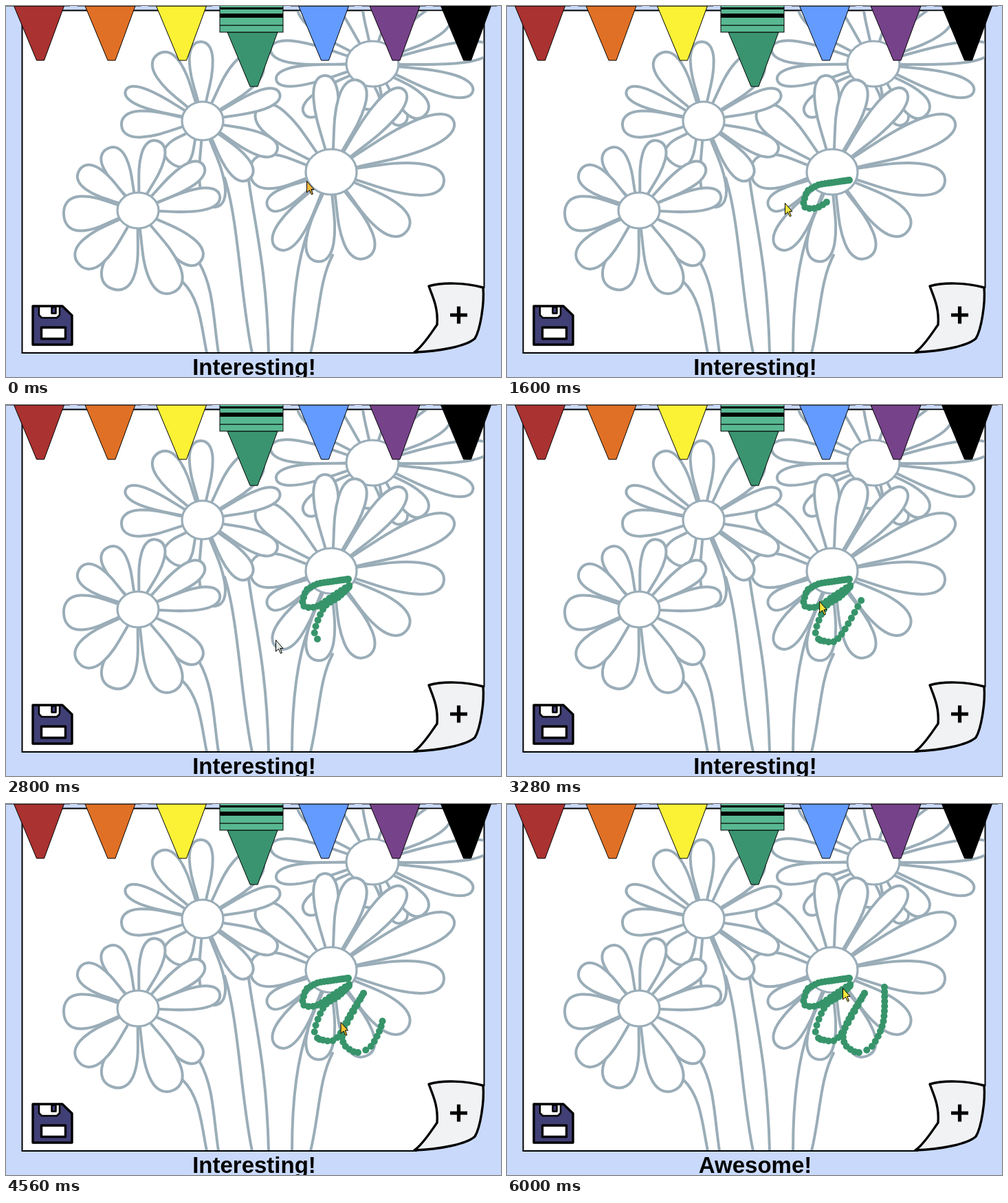
Animation of 720x539 px, one loop 6.36 s. Source, as an HTML page:

```html
<!DOCTYPE html>
<html lang="en">
<head>
<meta charset="utf-8">
<title>Colouring page</title>
<style>
html, body { margin: 0; width: 100%; height: 100%; overflow: hidden; background: #c9d9fb; }
svg { display: block; width: 720px; height: 539px; }
text { font: bold 33px "Liberation Sans", Arial, sans-serif; }
</style>
</head>
<body>
<svg viewBox="0 0 720 539">
  <rect width="720" height="539" fill="#c9d9fb"/>
  <path d="M23.5 6.5H695.5V409L597 504H23.5Z" fill="#fff" stroke="#000" stroke-width="2"/>
  <clipPath id="sheet"><path d="M24.5 7.500H694.500V503H24.500Z"/></clipPath>
  <g id="lines" clip-path="url(#sheet)" fill="#fff" stroke="#9aadb8" stroke-width="4" stroke-linecap="round" stroke-linejoin="round"></g>
  <defs id="trails"></defs>
  <g id="ink" fill="#37946a"></g>
  <g id="crayons" stroke="#000"></g>
  <g stroke="#000" stroke-width="3.4" stroke-linejoin="round">
    <path d="M39 436H82L96 449.500V492H39Z" fill="#403f76"/>
    <path d="M48 436.500H78V449L74 453H52L48 449Z" fill="#fff" stroke-width="2.500"/>
    <rect x="66.500" y="437.500" width="6" height="9" fill="#403f76" stroke-width="2.500"/>
    <rect x="51.500" y="467" width="35" height="16.500" fill="#fff"/>
    <path d="M615 407C635 401 668 402 694 409C696 432 690 470 682 483C670 494 630 502 594 503C607 494 619 474 627 463C629 438 620 421 615 407Z" fill="#f0f2f3"/>
    <path d="M646 449H671M658.500 436.500V461.500" fill="none" stroke-width="5.200"/>
  </g>
  <text id="praise" x="361" y="536" text-anchor="middle"></text>
  <path id="cursor" d="M.5 .5V17L4.500 13.500L7.500 20L9.500 19L6.800 12.500H11Z" stroke="#000" stroke-linejoin="round"/>
</svg>
<script>
const LOOP = 6360, STEP = 40;
const $ = id => document.getElementById(id);

function add(parent, tag, attrs) {
  const el = document.createElementNS('http://www.w3.org/2000/svg', tag);
  for (const k in attrs) el.setAttribute(k, attrs[k]);
  return parent.appendChild(el);
}

const points = s => s.split(' ').map(p => p.split(',').map(Number));

// Catmull-Rom spline through the points
function smooth(s) {
  const p = points(s);
  let d = 'M' + p[0];
  for (let i = 0; i < p.length - 1; i++) {
    const a = p[i - 1] || p[i], b = p[i], c = p[i + 1], e = p[i + 2] || c;
    const c1 = b.map((v, k) => v + (c[k] - a[k]) / 6);
    const c2 = c.map((v, k) => v - (e[k] - b[k]) / 6);
    d += `C${c1} ${c2} ${c}`;
  }
  return d;
}

// A petal widens from the flower's heart to a round tip at x, y
function petal(cx, cy, r, x, y, half) {
  const len = Math.hypot(x - cx, y - cy), u = f => r + (len - r) * f;
  const base = half * 0.3;
  const d = `M${u(0)} ${-base}C${u(.25)} ${-half * .6} ${u(.45)} ${-half} ${u(.7)} ${-half}` +
    `C${u(.9)} ${-half} ${len} ${-half * .6} ${len} 0` +
    `C${len} ${half * .6} ${u(.9)} ${half} ${u(.7)} ${half}` +
    `C${u(.45)} ${half} ${u(.25)} ${half * .6} ${u(0)} ${base}`;
  const turn = Math.atan2(y - cy, x - cx) * 180 / Math.PI;
  add($('lines'), 'path', { d, transform: `translate(${cx} ${cy}) rotate(${turn})` });
}

// Petals are listed as tip x, tip y, half width
function flower(cx, cy, rx, ry, petals, stem = '') {
  add($('lines'), 'path', { d: stem, fill: 'none' });
  points(petals).forEach(p => petal(cx, cy, ry - 3, ...p));
  add($('lines'), 'ellipse', { cx, cy, rx, ry, 'stroke-width': 3.2 });
}

flower(533, 84, 38, 33,
  '525,150,18 434,157,15 577,172,14 610,158,18 679,124,16 705,62,15 645,8,20 ' +
  '590,-20,22 540,-40,20 430,-15,25 385,62,16 393,107,14');
flower(473, 241, 37, 33,
  '367,148,21 463,101,18 512,108,20 579,122,18 651,167,22 637,255,23 ' +
  '583,327,23 524,366,22 452,371,20 394,352,19 381,292,14 355,240,25',
  'M440 325Q416 390 416 504M475 362C455 400 456 450 443 504');
flower(286, 167, 30, 28,
  '240,228,20 305,292,18 368,75,22 283,52,17 221,70,20 174,123,13 ' +
  '168,173,19 398,127,14 394,211,16 354,251,17',
  'M318 250C338 310 342 430 358 504M353 253C362 320 379 380 382 504');
flower(192, 297, 30, 26,
  '148,207,18 220,196,17 287,231,16 311,276,16 283,371,19 ' +
  '243,416,24 155,411,24 106,375,22 84,303,25 107,238,18',
  'M257 401C282 425 284 465 292 504M281 373C302 410 301 450 309 504');

function crayon(x, y, color) {
  const g = add($('crayons'), 'g', { transform: `translate(${x} ${y})` });
  add(g, 'path', { d: 'M-38.5 0L-5.500 79H5.500L34.500 0Z', fill: color });
  add(g, 'rect', { x: -49.5, y: -70, width: 92, height: 70, fill: '#58b892' });
  for (const [top, h] of [[-36, 3], [-27, 6], [-10.5, 1.2]])
    add(g, 'rect', { x: -49.5, y: top, width: 92, height: h, stroke: 'none' });
}
['#aa3231', '#e07025', '#fbf236', '#3a9470', '#639bff', '#76428a', '#000']
  .forEach((c, i) => crayon(50 + i * 103.5, i === 3 ? 38 : 0, c));

// The crayon leaves one dot per step while it follows a trail
function stroke(start, steps, power, trail) {
  const path = add($('trails'), 'path', { d: smooth(trail) });
  const length = path.getTotalLength();
  return Array.from({ length: steps }, (_, i) => {
    const { x, y } = path.getPointAtLength(length * (i / (steps - 1)) ** power);
    const el = add($('ink'), 'circle', { cx: x, cy: y, r: 5 });
    return { at: start + i * STEP, x, y, el };
  });
}

const dots = [
  stroke(640, 16, 1.4, '498,253 470,257 453,260 438,268'),
  stroke(1280, 15, 1, '435,273 432,291 451,293 476,277 499,262'),
  stroke(2200, 16, 1.6, '499,264 484,279 463,294 449,327 453,340'),
  stroke(2840, 13, 1.2, '456,342 475,344 488,331 503,306 520,275'),
  stroke(3640, 16, 1.1, '520,275 497,313 489,335 493,351 506,360'),
  stroke(4280, 15, 0.85, '512,361 530,353 545,325 549,300 549,266')
].flat();

const tints = [
  [0, '#f6b73c'], [120, '#f2e63c'], [2720, '#dfe4e0'],
  [2840, '#f8e63c'], [4480, '#f3c22c'], [4840, '#f8e63c']
];

const latest = (list, when, t) => list.filter(item => when(item) <= t).pop() || list[0];

function draw(t) {
  for (const d of dots) d.el.setAttribute('visibility', d.at <= t ? 'visible' : 'hidden');
  const hand = latest(dots, d => d.at, t);
  $('cursor').setAttribute('transform', `translate(${hand.x - 61} ${hand.y + 1})`);
  $('cursor').setAttribute('fill', latest(tints, k => k[0], t)[1]);
  $('praise').textContent = t < 5320 ? 'Interesting!' : 'Awesome!';
}

const begin = performance.now();
function frame() {
  draw((performance.now() - begin) % LOOP);
  requestAnimationFrame(frame);
}
frame();
</script>
</body>
</html>
```
